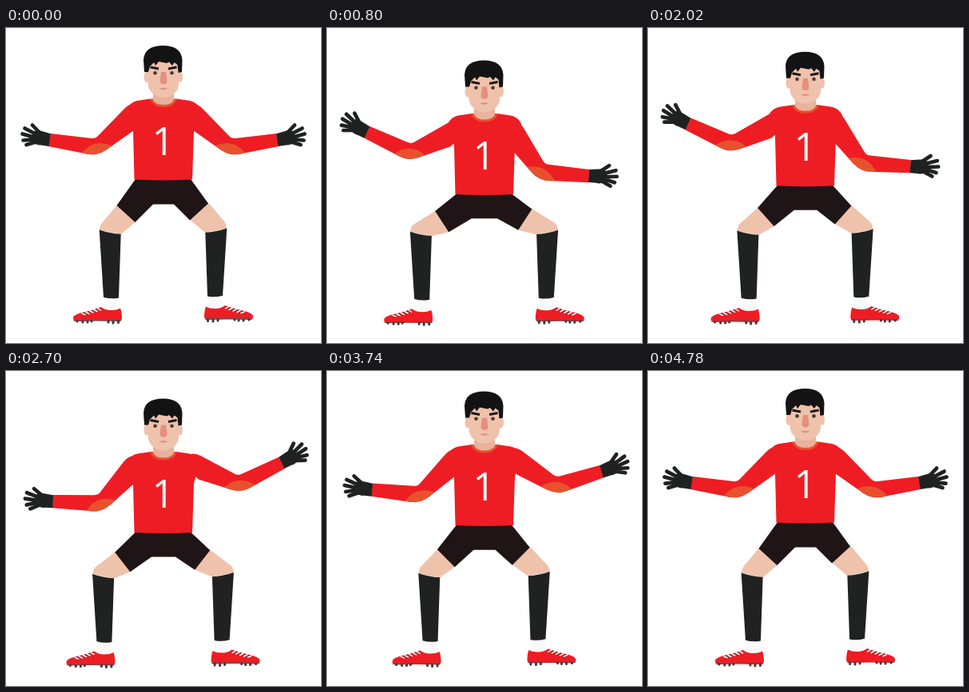
An HTML page that plays this animation: 394 by 394 pixels, repeating every 4.8 s.

```html
<!DOCTYPE html>
<html lang="en">
<head>
<meta charset="utf-8">
<title>Goalkeeper</title>
<style>
  html, body { margin: 0; width: 100%; height: 100%; overflow: hidden; background: #fff; }
  svg { display: block; width: 100%; height: 100%; }
  .red { fill: #ee1d23; }
  .dark { fill: #202221; }
  .skin { fill: #efc2ac; }
  .shade { fill: #e8b29c; }
  .patch { fill: #e8512d; }
  .line { fill: none; stroke-linecap: round; stroke-linejoin: round; }
  .number { font: 500 49px "Open Sans", "Noto Sans", sans-serif; fill: #fff; }
</style>
</head>
<body>
<svg viewBox="0 0 394 394">
  <defs>
    <g id="shin">
      <path fill="#f9f9f9" d="M123 335H140.500V353H122Z"/>
      <path class="dark" d="M116.700 252.500Q130 257 143.700 257.800L141 337.500Q132 339.500 122 336.800Z"/>
      <path class="red" d="M84 363Q84 358 97 355.500Q109 353 119 349Q124 353 131 353Q139 353 143 350.500Q145 355 145 364L143 367Q112 366 88 367Q84 366 84 363Z"/>
      <path class="line" stroke="#55555a" stroke-width="1" d="M85 366.200Q112 365 144 365.800"/>
      <path class="line" stroke="#3d3d3f" stroke-width="3" d="M89 366.500v.5M96 367v1M102 367v1M107 366.500v.5M128 366.500v1.500M134 367v2M140.500 366.500v2"/>
      <path class="line" stroke="#fff" stroke-width="1.500" d="M95 357l4 1.500M100 355.500l4 2M105 354l4 2M110 352.500l4 2M115 351l3.500 2"/>
      <path class="line" stroke="#444" stroke-width=".9" d="M97 356l5 2.500M103 354.500l4 2.500M108 353l4 2.500M113 351.500l4 2.500"/>
    </g>
    <g id="arm">
      <path class="red" d="M158 95Q153 96 148 101L115 135Q112 138.500 107 138L56 132L53 148L96 156.500Q112 161 126 152L160 128L170 110Z"/>
      <path class="patch" d="M95 156Q110 138 132 147Q120 158.500 108 158.500Q102 158 95 156Z"/>
      <path class="dark" d="M56 132.200L45 129Q36 126 33 132L33 142Q38 147 44 146.500L53.500 148Z"/>
      <path class="line" stroke="#202221" stroke-width="4.700" d="M33 121.500L43 132M23.500 125.500L38 133M20.500 132.500L37 137M21.500 140.500L38 139M25.500 146L41 141.500"/>
    </g>
  </defs>

  <g id="legs"></g>
  <path id="shorts" fill="#1f1516"/>

  <g id="body">
    <path class="red" d="M181 88.500L164 91Q156 92.500 151 101L159 128L160.500 189.500Q197 191.500 233 189.500L235 128L243 101Q238 92.500 230 91L213 88.500Z"/>
    <g id="armL"><use href="#arm"/></g>
    <g transform="translate(394 0) scale(-1 1)"><g id="armR"><use href="#arm"/></g></g>
    <text class="number" x="182.500" y="158.700">1</text>

    <path class="patch" d="M180 89Q184 99 197 99Q210 99 214 89Z"/>
    <path class="shade" d="M184 78V90Q187 96 197 96Q207 96 210 90V78Z"/>
    <ellipse class="skin" cx="176" cy="61" rx="3.500" ry="7"/>
    <ellipse class="skin" cx="217.500" cy="61" rx="3.500" ry="7"/>
    <path class="skin" d="M177 38H216V70Q216 78 209 83Q204 87 197 87Q190 87 185 83Q178 78 177.500 70Z"/>
    <path fill="#141314" d="M173 55L172 40Q173 22 196.500 22Q219 22 220.500 40L220 55L215.500 56L214.500 46L210.500 43L208 47L204 42.500L201 44L191 42L187 47L185 43L180 48L178 55Z"/>
    <path class="line" stroke="#1b1819" stroke-width="3" style="stroke-linecap:butt" d="M180.500 49L191 51M203 51L213.500 49"/>
    <circle cx="186.500" cy="56.300" r="2.300" fill="#4a3a35"/>
    <circle cx="207.500" cy="56.300" r="2.300" fill="#4a3a35"/>
    <path fill="#e58f7e" d="M194 55H200L201.500 67Q201 70 197 70.500Q193 70 192.500 67Z"/>
    <path fill="#e08f80" d="M191 75.500Q197 74 202.500 75.500Q197 79 191 75.500Z"/>
  </g>
</svg>
<script>
const LOOP = 4800, SQUAT = 1800, SWING = 1200;

// [time, value] steps, eased in and out between neighbours
const squat = [[0, 0], [600, 1], [1200, 0], [1800, 0]];
const swingL = [[0, 0], [290, -6.5], [450, -6.5], [760, 16.2], [800, 16.2], [1140, 0], [1200, 0]];
const swingR = [[0, 0], [290, -17.8], [400, -17.8], [720, 13.8], [780, 13.8], [1060, 0], [1200, 0]];

const $ = id => document.getElementById(id);
const mix = (a, b, p) => a + (b - a) * p;

function at(steps, t) {
  const i = steps.findIndex(s => s[0] > t);
  const [t0, a] = steps[i - 1], [t1, b] = steps[i];
  const x = (t - t0) / (t1 - t0);
  return mix(a, b, x * x * (3 - 2 * x));
}

// Right leg mirrors the left one, slightly higher
$('legs').innerHTML = ['', 'translate(393 -2) scale(-1 1)'].map(m =>
  `<g transform="${m}"><path class="skin thigh"/><g class="shin"><use href="#shin"/></g></g>`).join('');
const thighs = document.querySelectorAll('.thigh');
const shins = document.querySelectorAll('.shin');

function pose(t) {
  const p = at(squat, t % SQUAT);
  const drop = 25 * p, dx = -17.3 * p, dy = 3 * p;
  const ox = mix(138.5, 134, p), oy = mix(222, 231.5, p);
  const ix = mix(161.5, 149, p), iy = mix(243, 259.5, p);
  const cx = mix(184, 180, p), cy = 220.5 + mix(0, 24, p);
  const waist = 189 + drop;

  // The thigh starts a little inside the shorts
  const thigh = `M${ox + 3} ${oy - 2}L${ox} ${oy}L${119.5 + dx} ${244.5 + dy}` +
    `Q${117.5 + dx} ${247.5 + dy} ${116.7 + dx} ${253 + dy}` +
    `L${143.7 + dx} ${258 + dy}L${ix} ${iy}L${ix + 3} ${iy - 3}Z`;
  thighs.forEach(e => e.setAttribute('d', thigh));
  shins.forEach(e => e.setAttribute('transform', `translate(${dx} ${dy})`));
  $('shorts').setAttribute('d', `M162 ${waist}L${ox} ${oy}L${ix} ${iy}L${cx} ${cy}H${394 - cx}` +
    `L${391.5 - ix} ${iy - 2.5}L${391.5 - ox} ${oy - 2.5}L231 ${waist}Z`);

  $('body').setAttribute('transform', `translate(0 ${drop})`);
  const s = t % SWING;
  $('armL').setAttribute('transform', `rotate(${at(swingL, s)} 151 110)`);
  $('armR').setAttribute('transform', `rotate(${-at(swingR, s)} 172 104)`);
}

const start = performance.now();
function tick() {
  pose((performance.now() - start) % LOOP);
  requestAnimationFrame(tick);
}
tick();
</script>
</body>
</html>
```
